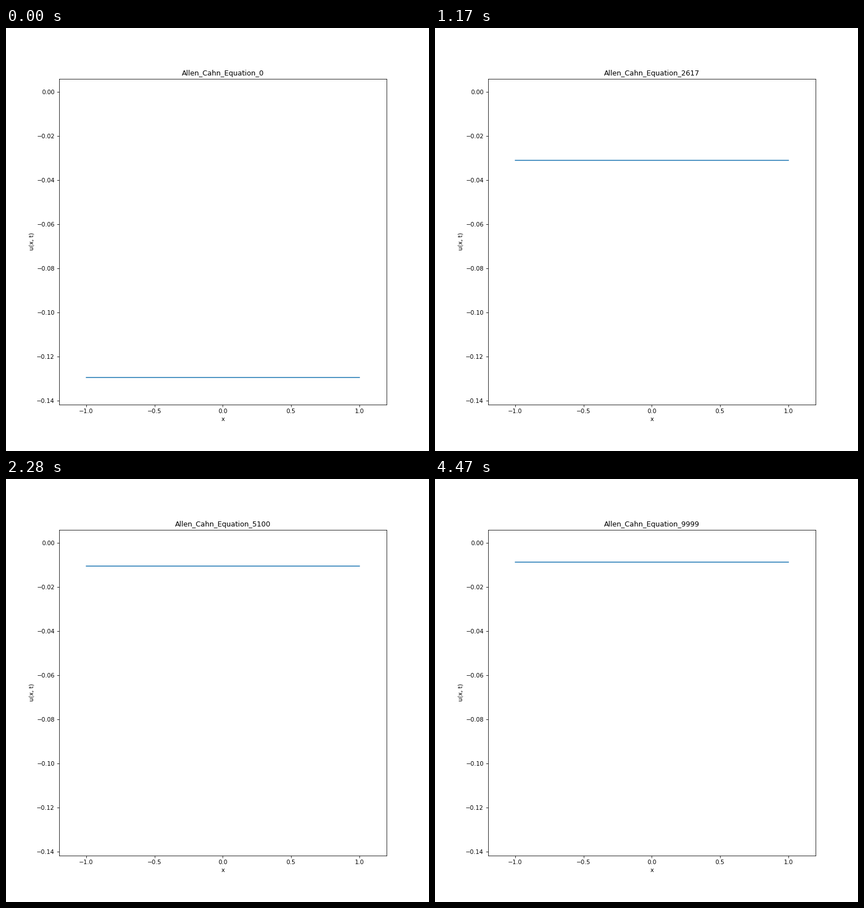
A matplotlib script that plays this animation: 748x748 px, repeating every 4.5 s.

```python
import numpy as np
import matplotlib.pyplot as plt
from matplotlib.animation import FuncAnimation

FRAMES = 150
INTERVAL = 30
MARGIN = 0.1


def smoothstep(t, start, end):
    s = np.clip((t - start) / (end - start), 0, 1)
    return s * s * (3 - 2 * s)


def level(frame):
    """Exponential relaxation with a slow start and a late dip."""
    lag = 0.115 * (1 - np.exp(-frame / 10))
    decay = np.exp(lag - 0.0433 * frame)
    return -0.00541 - 0.12403 * decay - 0.00297 * smoothstep(frame, 114, 150)


def padded(values):
    low, high = values.min(), values.max()
    pad = MARGIN * (high - low)
    return low - pad, high + pad


steps = np.linspace(0, 9999, FRAMES).astype(int)
levels = level(np.arange(FRAMES))
x = np.linspace(-1, 1, 100)

fig, ax = plt.subplots(figsize=(10, 10), dpi=74.8)
ax.set_xlim(*padded(x))
ax.set_ylim(*padded(levels))
ax.set_xlabel("x")
ax.set_ylabel("u(x, t)")
line, = ax.plot(x, np.full_like(x, levels[0]))
title = ax.set_title("")


def draw(frame):
    line.set_ydata(np.full_like(x, levels[frame]))
    title.set_text(f"Allen_Cahn_Equation_{steps[frame]}")
    return line, title


anim = FuncAnimation(fig, draw, frames=FRAMES, interval=INTERVAL, repeat=True)
plt.show()
```
